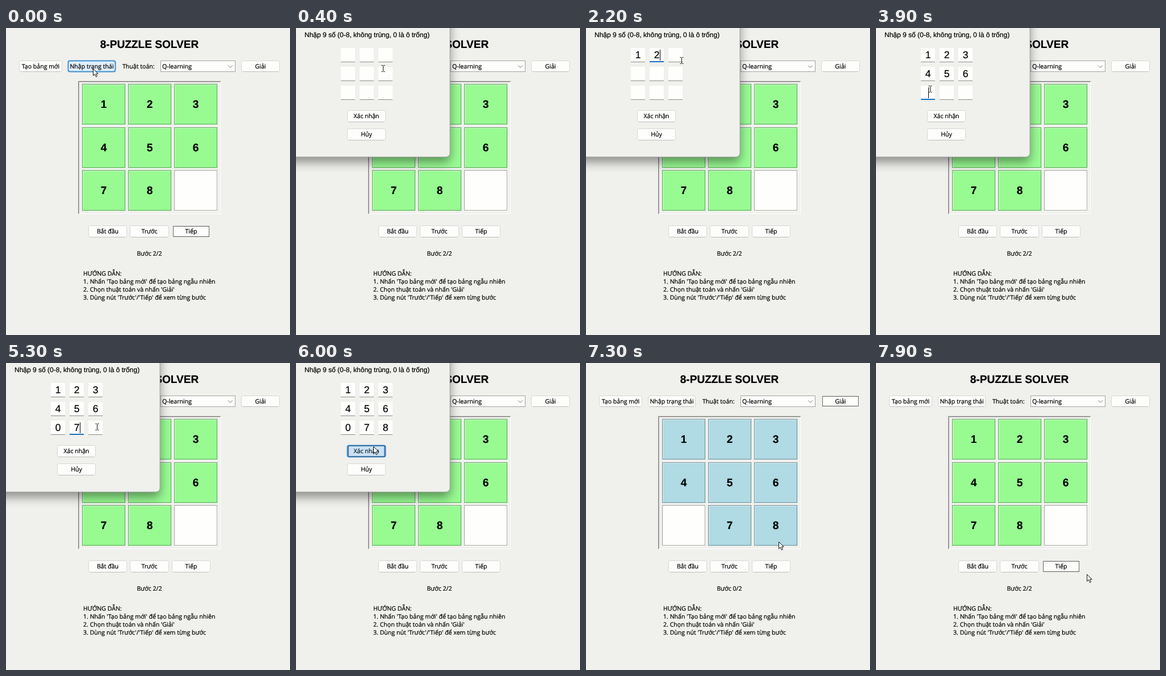
An HTML page that plays this animation: 500x538 px, repeating every 8 s.

```html
<!DOCTYPE html>
<html lang="vi">
<head>
<meta charset="utf-8">
<title>8-Puzzle Solver</title>
<style>
  html, body { margin: 0; width: 100%; height: 100%; overflow: hidden; background: #f0f0ed; }
  svg { display: block; width: 500px; height: 538px; }
  text { font: 10.6px "Open Sans", "Noto Sans", sans-serif; text-rendering: geometricPrecision; white-space: pre; stroke-width: .22px; }
  .title, .num { font: bold 19.1px "Liberation Sans", Arial, sans-serif; }
  .entry { font: 17.5px "Liberation Sans", Arial, sans-serif; }
  .prompt { font: 12px "Liberation Sans", Arial, sans-serif; }
  .mid { text-anchor: middle; }
  .window { filter: drop-shadow(0 9px 9px rgba(0, 0, 0, .42)); }
</style>
</head>
<body>
<svg id="stage" viewBox="0 0 500 538"></svg>
<script>
const LOOP = 8000, STEP = 100;
const OPEN = 300;    // the dialog appears
const LAG = 100;     // from reaching a control to clicking it
const DWELL = .55;   // share of each visit spent resting before moving on
const DIGITS = '123456078';
const HELP = [
  'HƯỚNG DẪN:',
  "1. Nhấn 'Tạo bảng mới' để tạo bảng ngẫu nhiên",
  "2. Chọn thuật toán và nhấn 'Giải'",
  "3. Dùng nút 'Trước'/'Tiếp' để xem từng bước"
];
const FILLS = { goal: '#98fb92', open: '#b0dae4', blank: '#fefefc' };

const col = i => i % 3, row = i => Math.floor(i / 3);
const slot = i => [79 + col(i) * 33, 35 + row(i) * 33];

// Where the pointer rests in an entry: it drifts across the grid
function entrySpot(i) {
  const [x, y] = slot(i);
  return [x + Math.min(23, 9 + 7 * col(i) + 3.5 * row(i)), y + 16 + 3 * col(i) - 5 * row(i)];
}

// The pointer's visits: start, nine entries, confirm, solve, next, away
const ARRIVE = [0, 900, 1600, 2200, 2700, 3000, 3300, 3800, 4700, 5400, 5900, 6500, 7400, 7900];
const SPOTS = [[153, 71], ...[...DIGITS].map((_, i) => entrySpot(i)),
  [136, 146], [432, 76], [322, 356], [371, 370]];
const CONFIRM = 9;
const leave = i => ARRIVE[i] + DWELL * (ARRIVE[i + 1] - ARRIVE[i]);

const [confirmAt, solveAt, nextAt] = ARRIVE.slice(10).map(t => t + LAG);
const CLOSE = confirmAt + LAG, SOLVED = solveAt + 400;
const STEP1 = nextAt, STEP2 = nextAt + 2 * LAG;

function pointerAt(t) {
  const i = ARRIVE.filter(a => a <= t).length - 1;
  const [x0, y0] = SPOTS[i], [x1, y1] = SPOTS[i + 1] || SPOTS[i];
  const u = i + 1 < ARRIVE.length ? Math.max(0, (t - leave(i)) / (ARRIVE[i + 1] - leave(i))) : 0;
  const e = u * u * (3 - 2 * u);
  return { x: Math.round(x0 + (x1 - x0) * e), y: Math.round(y0 + (y1 - y0) * e) };
}

const rect = (x, y, w, h, fill, more = '') =>
  `<rect x="${x}" y="${y}" width="${w}" height="${h}" fill="${fill}" ${more}/>`;
const frame = (x, y, w, h, color, more = '') =>
  rect(x + .5, y + .5, w - 1, h - 1, 'none', `stroke="${color}" ${more}`);
const text = (x, y, str, cls = '', fill = '#000') =>
  `<text x="${x}" y="${y}" class="${cls}" fill="${fill}" stroke="${fill}">${str}</text>`;
const inside = (p, x, y, w, h) => p.x >= x && p.x < x + w && p.y >= y && p.y < y + h;

function button(x, y, w, h, label, { hover, focus, off } = {}) {
  const fill = hover ? '#dfeefa' : off ? '#f7f7f4' : '#fdfdfc';
  const edge = hover ? '#3f8fd0' : focus ? '#e6e6e3' : '#d6d6d3';
  let s = rect(x + .5, y + .5, w - 1, h - 1, fill, `rx="3" stroke="${edge}" stroke-width="${hover ? 2 : 1}"`);
  if (!hover && !focus) s += rect(x + 3, y + h - 1, w - 6, 1, '#bdbdba');
  if (focus) {
    const box = [x + 2, y + 1, w - 4, h - 2];
    s += frame(...box, '#a4a4a2') + frame(...box, off ? '#666' : '#222', 'stroke-dasharray="1" stroke-dashoffset=".5"');
  }
  return s + text(x + w / 2, y + h / 2 + 3.8, label, 'mid', off ? '#7c7c7a' : '#000');
}

function tile(i, digit, skin) {
  const x = 134 + col(i) * 81, y = Math.round(98 + row(i) * 75.5), w = 77, h = 72;
  return rect(x, y, w, h, FILLS[digit === '0' ? 'blank' : skin]) +
    frame(x + 1, y + 1, w - 1, h - 1, '#fff', 'stroke-opacity=".55"') +
    frame(x, y, w - 1, h - 1, '#000', 'stroke-opacity=".36"') +
    (digit === '0' ? '' : text(x + 38, y + 42.3, digit, 'num mid'));
}

function board(cells, skin) {
  return `<path d="M127.5 326V93.5H378" fill="none" stroke="#858583"/>
    <path d="M128.5 325V94.5H377" fill="none" stroke="#b0b0ad"/>
    <path d="M128 325.5H377.5V94" fill="none" stroke="#fff"/>` +
    [...cells].map((d, i) => tile(i, d, skin)).join('');
}

function mainWindow(t, p) {
  const entered = t >= CLOSE, modal = t >= OPEN && !entered;
  const solving = t >= solveAt && t < SOLVED;
  const goal = !entered || t >= STEP2;
  const cells = goal ? '123456780' : t >= STEP1 ? '123456708' : DIGITS;
  const done = goal ? 2 : t >= STEP1 ? 1 : 0;
  const total = entered && t < solveAt ? 0 : 2;
  const btn = (x, y, w, h, label, opt = {}) =>
    button(x, y, w, h, label, { hover: !modal && !opt.off && inside(p, x, y, w, h), ...opt });

  return rect(0, 0, 500, 538, '#f0f0ed') +
    text(252.5, 35, '8-PUZZLE SOLVER', 'title mid') +
    btn(23, 57, 76, 20, 'Tạo bảng mới') +
    btn(109, 57, 84, 20, 'Nhập trạng thái') +
    text(205, 71, 'Thuật toán:') +
    rect(272.5, 57.5, 131, 19, '#fdfdfc', 'stroke="#a3a3a0"') +
    text(275, 71, 'Q-learning') +
    '<path d="M391 65.5l4 4 4-4" fill="none" stroke="#777"/>' +
    btn(414, 57, 68, 20, 'Giải', { off: solving, focus: t >= solveAt && t < STEP1 }) +
    board(cells, goal ? 'goal' : 'open') +
    btn(145, 346, 68, 21, 'Bắt đầu') +
    btn(218, 346, 69, 21, 'Trước') +
    btn(292, 346, 68, 21, 'Tiếp', { focus: t < OPEN || t >= STEP1 }) +
    (solving ? text(252.5, 399, 'Đang giải bằng Q-learning...', 'mid', '#1010f0')
      : text(252.5, 399, `Bước ${done}/${total}`, 'mid')) +
    HELP.map((line, i) => text(136, 434 + i * 14, line)).join('');
}

function entry(i, t, focused) {
  const [x, y] = slot(i), filled = t >= leave(i + 1);
  let s = rect(x, y, 25, 25, '#fefefd') +
    (focused ? rect(x, y + 23, 25, 2, '#1a6fc0') : rect(x, y + 24, 25, 1, '#8c8c8a'));
  if (filled) s += text(x + 12.5, y + 18, DIGITS[i], 'entry mid');
  if (focused) s += rect(x + (filled ? 18 : 13), y + 3, 1, 19, '#000');
  return s;
}

function dialog(t, p) {
  const focus = ARRIVE.filter(a => a + LAG <= t).length - 2;
  const btn = (y, label, focused) =>
    button(90, y, 68, 21, label, { hover: inside(p, 90, y, 68, 21), focus: focused });
  return `<path class="window" d="M-60-60H271V219a7 7 0 0 1-7 7H-60z" fill="#f0f0ed"/>
    <path d="M271 0V219a7 7 0 0 1-7 7H0" fill="none" stroke="#a2a2a0"/>` +
    text(15, 16, 'Nhập 9 số (0-8, không trùng, 0 là ô trống)', 'prompt') +
    [...DIGITS].map((_, i) => entry(i, t, i === focus)).join('') +
    btn(144, 'Xác nhận', focus === CONFIRM) +
    (focus === CONFIRM ? rect(91, 145, 66, 19, '#5a9fd8', 'fill-opacity=".16" rx="2" stroke="#2d6ea6"') : '') +
    btn(176, 'Hủy');
}

function pointer(p, typing) {
  const beam = typing && [...DIGITS].some((_, i) => inside(p, ...slot(i), 25, 25));
  const d = beam ? 'M-2.5-5.5H-.5L.5-4.5 1.5-5.5H3.5M.5-4.5V4.5M-2.5 5.5H-.5L.5 4.5 1.5 5.5H3.5'
    : 'M.5.5V12.5L3.3 9.9 5.4 14.6 7.5 13.7 5.4 9.1H9.2z';
  return `<path transform="translate(${p.x} ${p.y})" d="${d}" fill="${beam ? 'none' : '#fff'}" stroke="#111"/>`;
}

const stage = document.getElementById('stage');
let shown = -1;

function draw() {
  const t = Math.floor(performance.now() % LOOP / STEP) * STEP;
  if (t !== shown) {
    shown = t;
    const p = pointerAt(t), modal = t >= OPEN && t < CLOSE;
    stage.innerHTML = mainWindow(t, p) + (modal ? dialog(t, p) : '') + pointer(p, modal);
  }
  requestAnimationFrame(draw);
}
draw();
</script>
</body>
</html>
```
